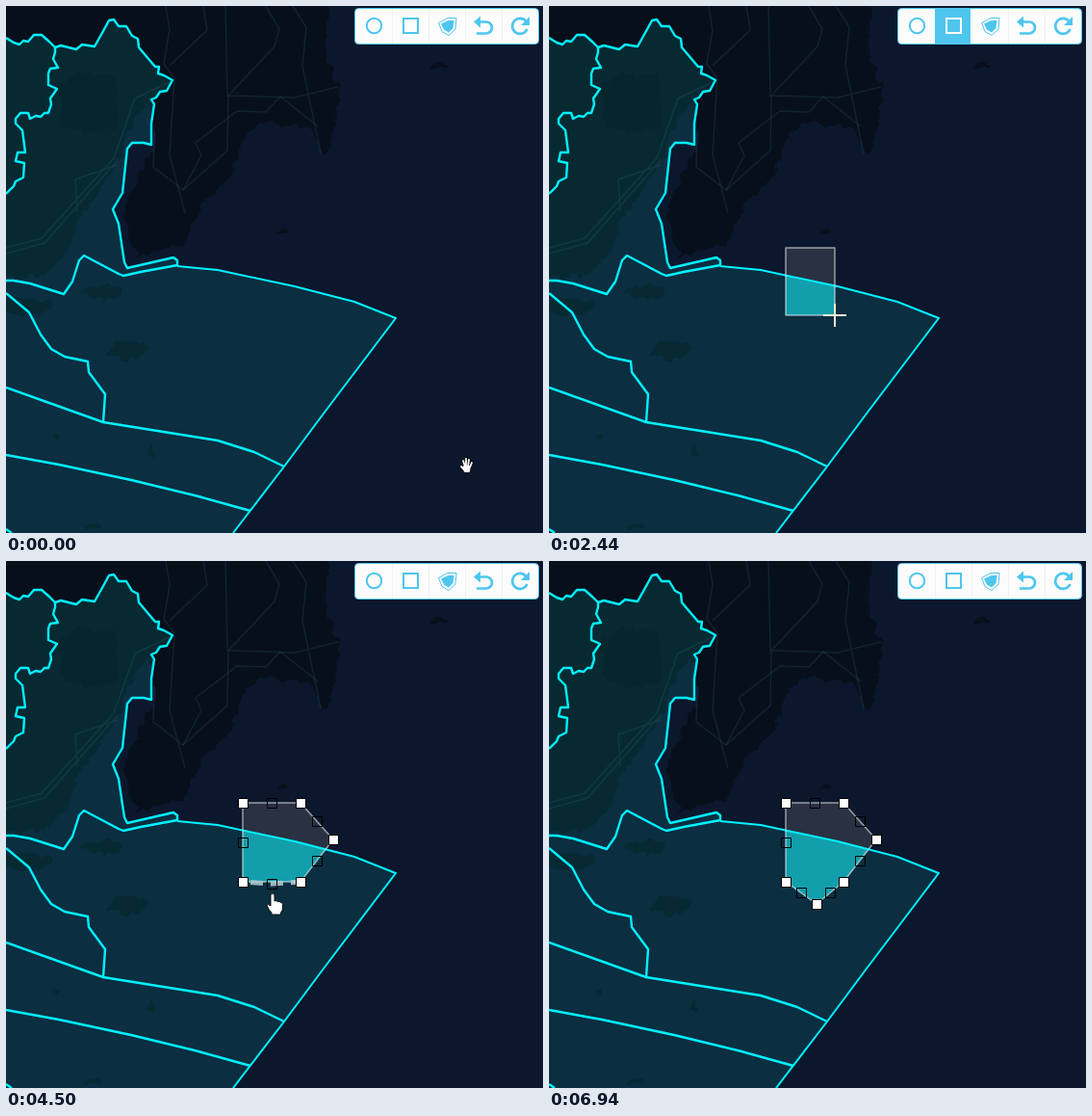
These frames come from a looping animation (558x547 px, 7.33 s). An HTML page:

```html
<!DOCTYPE html>
<html lang="en">
<head>
<meta charset="utf-8">
<title>Map drawing tools</title>
<style>
  html, body { margin: 0; width: 100%; height: 100%; overflow: hidden; background: #0b172c; }
  svg { display: block; width: 558px; height: 547px; }
  path { stroke-linejoin: round; }
  .line { fill: none; stroke: #00f2ff; stroke-width: 2; }
  .shared { stroke-width: 2.4; }
  .road { fill: none; stroke: #4a8095; stroke-opacity: .16; stroke-width: 1.5; }
  .icon { fill: none; stroke: #4ec6ee; stroke-width: 2; }
  .solid { fill: #4ec6ee; }
</style>
</head>
<body>
<svg viewBox="0 0 558 547">
  <defs>
    <filter id="rough" x="-5%" y="-5%" width="110%" height="110%" color-interpolation-filters="sRGB">
      <feTurbulence type="fractalNoise" baseFrequency=".1" numOctaves="3" seed="4"/>
      <feDisplacementMap in="SourceGraphic" scale="12" xChannelSelector="R" yChannelSelector="G"/>
    </filter>
    <clipPath id="inRegion"><path id="region"/></clipPath>
    <g id="land" filter="url(#rough)">
      <path d="M-10-10H334L331 50 346 84 338 145 330 154 317 127 268 121 249 132 234 176 205 204 184 247 135 260 122 212 154 146 151 97 130 124 116 163 73 226 66 254 42 279-10 283Z"/>
      <g id="islands"></g>
    </g>
  </defs>

  <rect width="558" height="547" fill="#0b172c"/>
  <use href="#land" fill="#070f1b"/>
  <g clip-path="url(#inRegion)">
    <rect width="558" height="547" fill="#0b2e41"/>
    <use href="#land" fill="#072932"/>
    <path d="M52 85L75 70 115 72 116 125 95 132 60 125Z" fill="#04262c" filter="url(#rough)"/>
  </g>
  <g class="road">
    <path d="M166 0L170 25 164 60 175 75 170 155 186 215M205 0L209 25 170 62"/>
    <path d="M270 0L284 24 279 42 231 93 230 150 184 191 153 167 154 130"/>
    <path d="M228 0L230 93 300 95 345 84M298 0L312 22 308 62 327 153"/>
    <path d="M184 191L203 155 197 142 240 109 270 110 285 94 324 125"/>
    <path d="M0 251L37 241 112 158 134 96 172 78M0 257L40 246 116 160M74 213L72 180 116 165"/>
  </g>

  <path id="fill" fill="#293142"/>
  <g clip-path="url(#inRegion)"><path id="fillInside" fill="#129eab"/></g>
  <g id="borders"></g>
  <path id="outline" fill="none" stroke="#fff" stroke-opacity=".55" stroke-width="1.5"/>
  <path id="preview" fill="none" stroke="#b5cdd1" stroke-opacity=".85" stroke-width="5" stroke-dasharray="13 8" stroke-dashoffset="13"/>
  <path id="mids" fill="none" stroke="#000"/>
  <path id="corners" fill="#fff" stroke="#000"/>

  <g id="toolbar">
    <rect x="362.5" y="2.5" width="191" height="37" rx="4" fill="#fcfcfc" stroke="#4ec6ee"/>
    <path d="M401.5 3v36m38-36v36m38-36v36m38-36v36" stroke="#f1f1f1"/>
    <rect id="active" x="401" y="3" width="37" height="36" fill="#4ec6ee"/>
    <circle class="icon" cx="382.5" cy="20.5" r="7.7"/>
    <rect id="square" class="icon" x="413" y="13" width="15" height="15"/>
    <path class="icon" style="stroke-width:1" d="M449.5 17.5L459 12.5 468 12.5 467 24 460 30.5 453 26.5Z"/>
    <path class="solid" d="M452 18.5L459.500 15 465.500 15 464.500 23 460 27.500 455 24.500Z"/>
    <path class="icon" style="stroke-width:2.700" d="M491 16.500H499a6 6 0 0 1 0 12H489M540.500 16A8 8 0 1 0 541.500 24"/>
    <path class="solid" d="M486 16.500l7-6v12zM544 11v9h-9z"/>
  </g>

  <g id="cursor">
    <path id="finger" fill="#fff" stroke="#111" d="M-2 2a2 2 0 0 1 4 0V8q2-1 3.300.6 2-.6 3 .8 2.200-.2 2.200 1.800V15q0 3-2 5v2H-1v-2q-3-3-5-7.500 1-2 4 .5Z"/>
    <g id="grab" stroke-linecap="round" fill="#fff">
      <path id="palm" d="M-3-5L-1 1M0-7V1M3-6L2 1M6-3L4 2M-5 1L-2 4M-2 1H4L3 6H-1L-3 3Z"/>
    </g>
    <path id="cross" d="M-12 0H12M0-12V12" stroke="#f6ecdc" stroke-width="2"/>
  </g>
</svg>
<script>
const LOOP = 7330, STEP = 78.97, FIRST = 56;
const $ = id => document.getElementById(id);
const setPath = (id, d) => $(id).setAttribute('d', d);
const show = (id, on) => $(id).style.display = on ? '' : 'none';

// Borders
const crest = '0 33 8 38 14 40 18 36 23 37 29 30 37 30 45 37 51 43';
const inlet = '51 43 51 48 49 55 54 64 46 65 44 70 44 82 53 86 46 96 47 102 44 111 40 111 36 115 31 114 25 117 23 111 15 111 10 117 10 122 17 129 20 152 12 152 10 161 19 163 18 178 10 182 8 187 0 195';
const ridge = '51 43 57 41 73 45 79 40 92 42 101 26 107 15 112 14 117 21 125 21 131 31 137 34 138 43 155 63 159 63 158 70 164 72 173 77 167 88 160 89 156 95 151 97 154 102 151 122 151 144 143 142 131 142 126 148 121 194 111 211 117 226 123 266 126 272 174 261 178 264 178 270';
const arc = '178 270 220 274 300 291 362 307 405 324 330 423 289 478 236 547';
const shore = '0 285 8 285 25 288 60 299 69 286 76 264 81 259 117 278 122 280 140 276 178 269';
const inner = [
  '0 298 24 318 36 341 47 356 61 364 85 369 86 380 103 403 101 432',
  '0 396 101 432 220 451 258 463 289 478',
  '0 466 55 476 130 492 200 509 254 524', '0 543 6 547'
];
setPath('region', `M${crest} ${ridge} ${arc} 0 547Z`);
$('borders').innerHTML = `<path class="line" d="M${arc}"/>` +
  [crest, inlet, ridge, shore, ...inner].map(p => `<path class="line shared" d="M${p}"/>`).join('');

// Islands: centre and radii
$('islands').innerHTML = [
  [20, 312, 28, 8], [100, 297, 20, 7], [125, 357, 20, 10], [51, 446, 3, 3],
  [152, 462, 4, 4], [90, 541, 8, 4], [286, 236, 6, 3], [451, 62, 9, 4]
].map(([x, y, rx, ry]) => `<ellipse cx="${x}" cy="${y}" rx="${rx}" ry="${ry}"/>`).join('');

// The open hand is a dark copy with a thinner white one on top
const palm = $('palm'), palmTop = palm.cloneNode();
palm.setAttribute('style', 'stroke:#111;stroke-width:3.5');
palmTop.setAttribute('style', 'stroke:#fff;stroke-width:1.8');
palm.after(palmTop);

// Pointer gestures: first step, last step, path
const gestures = [
  [-1, 9, 'M478 477L438 32'], [9, 11, 'M438 32L428 27'],
  [12, 20, 'M428 27Q350 180 268 281'], [20, 23, 'M268 281L246 251'],
  [24, 31, 'M246 251L306 333'], [31, 34, 'M306 333L316 305'],
  [34, 39, 'M316 305L307 297 306 292'], [40, 43, 'M306 292L340 289'],
  [44, 47, 'M340 289L279 344'], [48, 53, 'M279 344L276 335'],
  [55, 60, 'M276 342L279 357'], [65, 67, 'M279 357L296 344'],
  [68, 75, 'M296 344C190 350 190 262 262 262Q300 262 345 305'],
  [75, 78, 'M345 305Q374 300 374 318'],
  [78, 87, 'M374 318Q300 400 204 360Q380 440 524 552']
].map(([from, to, d]) => {
  const path = document.createElementNS('http://www.w3.org/2000/svg', 'path');
  path.setAttribute('d', d);
  return { from, to, path, length: path.getTotalLength() };
});

function pointer(n) {
  const g = gestures.findLast(g => g.from < n) || gestures[0];
  const p = Math.min(1, Math.max(0, (n - g.from) / (g.to - g.from)));
  const { x, y } = g.path.getPointAtLength(g.length * p);
  return [Math.round(x), Math.round(y)];
}

function shapeAt(n, [x, y]) {
  if (n < 25) return [];
  if (n < 32) return [[246, 251], [x, 251], [x, y], [246, y]];
  const pts = [[246, 251], [306, 251], [306, 333], [246, 333]];
  if (n >= 45) pts.splice(2, 0, [340, 289]);
  if (n >= 64) pts.splice(4, 0, [278, 356]);
  return pts;
}

const poly = pts => pts.length ? 'M' + pts.join('L') : '';
const boxes = pts => pts.map(([x, y]) => `M${Math.floor(x) - 4.5} ${Math.floor(y) - 4.5}h10v10h-10z`).join('');

function draw(n) {
  const pos = pointer(n), [x, y] = pos;
  const pts = shapeAt(n, pos);
  const drawing = n >= 13 && n < 32, editing = n >= 32;
  const outline = pts.length ? poly(pts) + 'Z' : '';
  for (const id of ['fill', 'fillInside', 'outline']) setPath(id, outline);

  const next = i => pts[(i + 1) % pts.length];
  const mids = pts.map((a, i) => [(a[0] + next(i)[0]) / 2, (a[1] + next(i)[1]) / 2]);

  // A dragged edge handle trails the pointer by one step
  const edge = n >= 41 && n < 45 ? 1 : n >= 56 && n < 64 ? 3 : -1;
  if (edge >= 0) mids[edge] = pointer(n - 1);
  setPath('preview', edge < 0 ? '' : poly([next(edge), mids[edge], pts[edge]]));
  setPath('mids', editing ? boxes(mids) : '');
  setPath('corners', editing ? boxes(pts) : '');

  show('active', drawing);
  $('square').style.stroke = drawing ? '#fff' : '';

  const openSea = x > 405 || (x - 405) * 223 + (y - 324) * 169 > 0;
  const kind = y < 40 ? 'finger' : drawing ? 'cross' : openSea ? 'grab' : 'finger';
  for (const id of ['finger', 'grab', 'cross']) show(id, id === kind);
  $('cursor').setAttribute('transform', `translate(${x} ${y})`);
  show('cursor', n < 87);
}

const start = performance.now();
let shown;
function tick(now) {
  const t = Math.max(0, now - start) % LOOP;
  const n = Math.floor((t - FIRST) / STEP);
  if (n !== shown) draw(shown = n);
  requestAnimationFrame(tick);
}
tick(start);
</script>
</body>
</html>
```
